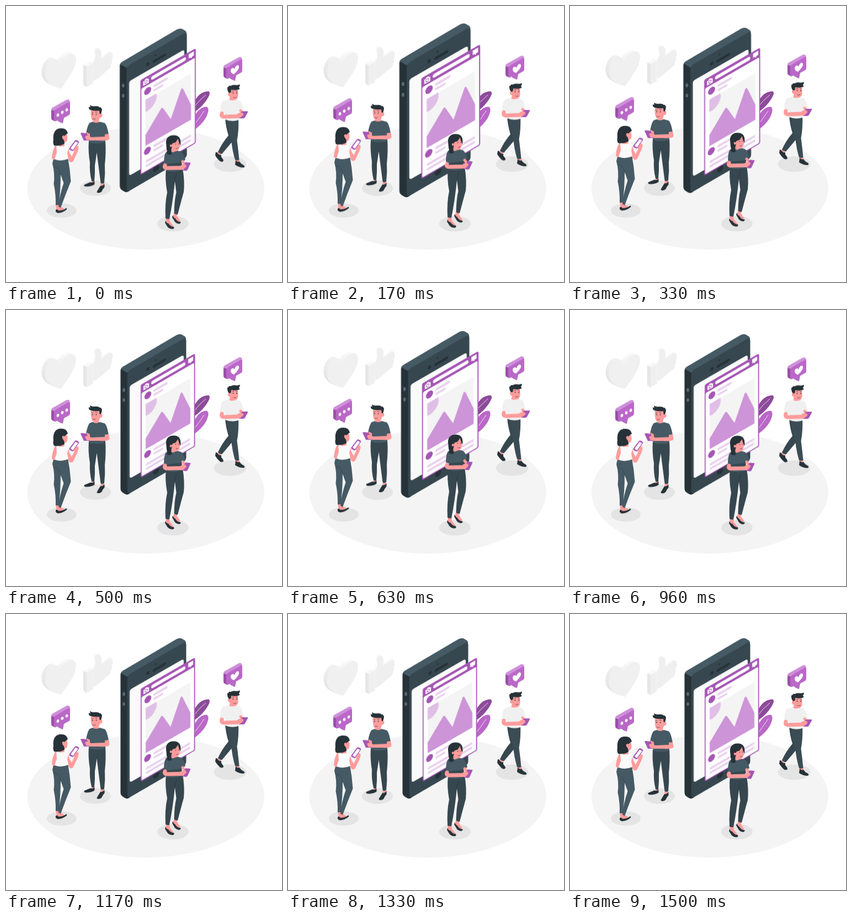
An HTML page that plays this animation: 500x500 px, repeating every 1540 ms.

```html
<!DOCTYPE html>
<html lang="en">
<head>
<meta charset="utf-8">
<title>Social feed</title>
<style>
  html, body { margin: 0; width: 100%; height: 100%; overflow: hidden; background: #fff; }
  svg { display: block; width: 100%; height: 100%; }

  .beat { transform-origin: 275px 189.5px; animation: beat 1540ms linear infinite; }
  .float { animation: float 1540ms linear infinite; }

  @keyframes beat {
    0% { transform: scale(1.02); }
    7.92% { transform: scale(1.1); }
    27.4% { transform: scale(1); }
    37.14% { transform: scale(1); }
    46.88% { transform: scale(1.1); }
    56.62%, 100% { transform: scale(1); }
  }
  @keyframes float {
    0% { transform: translateY(-.4px); }
    46.75% { transform: translateY(-10px); }
    95.5%, 100% { transform: translateY(0); }
  }

  .skin { fill: #ff9c9c; }
  .ink { fill: #263238; }
  .slate { fill: #37474f; }
  .steel { fill: #455a64; }
  .pur { fill: #ba68c8; }
  .deep { fill: #a656b5; }
  .pale { fill: #ead2ee; }
  .white { fill: #fff; }
  .line { fill: none; stroke: #263238; stroke-width: .7; stroke-linecap: round; }
  .arm { fill: none; stroke: #ff9c9c; stroke-width: 7; stroke-linecap: round; stroke-linejoin: round; }
  .thin { stroke-width: 5; }
</style>
</head>
<body>
<svg viewBox="0 0 500 500">
  <defs>
    <linearGradient id="rim" x1="0" y1="1" x2=".6" y2="0">
      <stop offset="0" stop-color="#e0e0e0"/>
      <stop offset="1" stop-color="#f8f8f8"/>
    </linearGradient>
    <clipPath id="photo"><rect x="9" y="40" width="81" height="80"/></clipPath>
    <path id="heart" d="M100 150C92 147 70.500 143 70.500 123C70.500 106 82 95 89 96C94 97 96 101 97 106C100 97 111 86.500 120 87C129 89 128 101 124 111C118 126 106 140 100 150Z"/>
    <path id="thumb" d="M158 136V104C161 100 163 96 162 90L161 82Q163 76 169 78Q174 81 173 89L172 96L187 85Q193 83 193 89Q195 94 191 98Q194 102 190 106Q191 111 187 114L168 130Q162 135 158 136Z"/>
    <g id="bubble">
      <path fill="#9a4fa8" d="M82 188L88 190V209L84 207Q82 206 82 203Z"/>
      <path fill="#ce8fd9" d="M82 189Q82 185 85 184L110 170Q113 169 115 171L116 175L89 191L87 190Z"/>
      <path class="pur" d="M87 193Q87 190 89 188.500L113 174.500Q116 173 116 176.500V194Q116 197 114 198L105 203L103 213L95 207L90 209Q87 210 87 207Z"/>
      <path fill="#9a4fa8" d="M93 208L95 207L103 213L100 212Z"/>
    </g>
  </defs>

  <ellipse cx="253.3" cy="330.3" rx="214.5" ry="111" fill="#f4f4f4"/>
  <g fill="#e4e4e4">
    <ellipse cx="101" cy="370.5" rx="27" ry="13"/>
    <ellipse cx="162" cy="330" rx="28" ry="14"/>
    <ellipse cx="302.3" cy="394.5" rx="28.5" ry="14"/>
    <ellipse cx="406" cy="286.5" rx="29.5" ry="14"/>
  </g>

  <!-- leaves -->
  <path fill="#8c4b9a" d="M336 194C337 175 348 154.500 367 154.500Q370 155.500 368.500 161C364 172 352 186 340 193Z"/>
  <path class="pur" d="M334 228C337 205 346 183 363 182.500Q367 183 366.500 190C364 204 354 216 336 228Z"/>
  <path fill="none" stroke="#fff" stroke-width=".8" d="M338 187Q348 172 362 161M338 219Q350 204 359 190"/>

  <!-- phone -->
  <g class="beat">
    <path class="ink" d="M207.400 110Q207.400 105.500 211.500 103L309 45.500Q315 42.500 319 45L324 48Q326.300 50 326.300 56V268Q326 272 321 275L226 331Q220 336.500 215 333L211 330.500Q207.400 328 207.400 323Z"/>
    <path class="steel" d="M208.200 107Q209 104.500 211.500 103L309 45.500Q315 42.500 319 45L324 48Q325.500 49 326 52L300 70L222 113L219.500 113.500Z"/>
    <g fill="#566a74">
      <ellipse cx="213.500" cy="145" rx="2.300" ry="3.500"/>
      <ellipse cx="213.500" cy="163" rx="2.300" ry="3.500"/>
    </g>
    <g transform="translate(219.600 111) skewY(-30)">
      <rect class="slate" width="106.700" height="223.500" rx="6"/>
      <rect x="4.400" y="29" width="98" height="168" rx="4" fill="#fafafa"/>
      <g class="ink">
        <circle cx="37.400" cy="17.500" r="3"/>
        <rect x="46" y="16.500" width="24" height="4.800" rx="2.400"/>
        <circle cx="51.400" cy="9.500" r="1.500"/>
        <circle cx="52.400" cy="211" r="5.500"/>
      </g>
    </g>

    <!-- feed card -->
    <g transform="translate(244 135.500) skewY(-30)">
      <rect class="deep" width="98.500" height="168.500" rx="3"/>
      <rect class="white" x="1.700" y="16" width="95" height="150.700" rx="2"/>
      <g class="white">
        <path d="M5 5.500H7.500L8.500 3.500H12L13 5.500H15V13H5Z"/>
        <rect x="19" y="4.800" width="62" height="6.500" rx="3.250"/>
        <path d="M86 3.500H95V11H92L90.500 13.500L89 11H86Z"/>
      </g>
      <circle cx="10" cy="9" r="2.300" fill="none" stroke="#a656b5"/>
      <circle class="deep" cx="13" cy="26.500" r="6.200"/>
      <circle class="deep" cx="12.500" cy="132.500" r="6.200"/>
      <g class="pale">
        <rect x="23" y="22" width="26" height="4.500" rx="2.200"/>
        <rect x="23" y="30" width="18" height="4" rx="2"/>
        <rect x="23" y="128.500" width="26" height="4.500" rx="2.200"/>
        <rect x="23" y="136.500" width="18" height="4" rx="2"/>
        <rect x="9" y="148" width="81" height="4.300" rx="2.100"/>
        <rect x="9" y="156" width="81" height="4.300" rx="2.100"/>
      </g>
      <g clip-path="url(#photo)">
        <rect x="9" y="40" width="81" height="80" fill="#f4f4f4"/>
        <circle cx="12" cy="45" r="17" fill="#e0bfe7"/>
      </g>
    </g>
    <path fill="#cd94d8" d="M253 233L281 185.500Q283 183 285 186L298 204.500L316 152Q318 147 320.500 152L334 179V205.500L253 252Z"/>
  </g>

  <g class="float">
    <!-- heart and thumb -->
    <use href="#heart" x="-6" y="-2.500" fill="url(#rim)"/>
    <use href="#heart" x="-3" y="-1" fill="url(#rim)"/>
    <use href="#heart" fill="#f0f0f0"/>
    <use href="#thumb" x="-1.500" y="-2" fill="#f8f8f8"/>
    <use href="#thumb" fill="#efefef"/>
    <path fill="#e6e6e6" d="M140 107L146 110V147L140 143Z"/>
    <path fill="#f8f8f8" d="M140 107L152 101L157 104L146 110Z"/>
    <path fill="#efefef" d="M146 110L157.500 104V140.500L146 147Z"/>

    <!-- bubbles -->
    <use href="#bubble"/>
    <g class="white">
      <ellipse cx="94" cy="198" rx="2.300" ry="2.900" transform="rotate(20 94 198)"/>
      <ellipse cx="102" cy="193" rx="2.300" ry="2.900" transform="rotate(20 102 193)"/>
      <ellipse cx="110" cy="188.500" rx="2.300" ry="2.900" transform="rotate(20 110 188.500)"/>
    </g>
    <g transform="translate(312 -77)">
      <use href="#bubble"/>
      <path class="white" d="M101 201C98 200 95 198 95 194.500C95 190 100 188 102 191.500C104 185 109 182 110 187C111 191.500 104 198 101 201Z"/>
    </g>

    <!-- woman with her back turned -->
    <g>
      <path class="skin" d="M90 359H97L98 364L105 367L104 372L92 372Z"/>
      <path class="ink" d="M90 370Q92 367 95 371Q103 371 109 366.500Q111 367 110 369Q102 375.500 94 375.500Q89 374 90 370Z"/>
      <path class="steel" d="M86 277L112 275Q116 296 117.500 318Q108 341 99 366L95 363.500Q97 343 104.500 321L99 306Q99 335 95.500 361H90Q90.500 341 86.500 323Q89 304 84 286Z"/>
      <path fill="none" stroke="#37474f" stroke-width=".8" d="M86 292Q97 292 99 306"/>
      <path class="skin" d="M90 252Q84 261 83 276L86 279L92 277L93 256Z"/>
      <path class="skin" d="M108 255Q113 256 115 266L119 273L124 263L126 257L131 255Q132 260 129 266L122 281Q118 286 114 281L108 270Z"/>
      <path fill="#fafafa" d="M91 252L108 251L113 258L111 267L113 277Q100 283 88 278L92 266Z"/>
      <path class="skin" d="M99 230H109Q112.500 236 111 244Q109.500 248 105 247.500L106 254L96 255Z"/>
      <path class="ink" d="M86 243C84.500 228 91 222 99 222Q110 221 112 231Q108 233 106 236Q104 234 102 236Q101 240 104 242Q106 245 106 250Q97 255 87 253Q84.500 248 86 243Z"/>
      <path class="deep" d="M114.500 258L125 244Q126 243 128 243.500L131 245Q133 246 132 248L122.500 262Q121 263.500 119 262.500L115 260.500Q114 259.500 114.500 258Z"/>
      <path class="white" d="M116.800 258.300L126 245.800L130.600 248L121.300 261Z"/>
      <path class="skin" d="M122 262L125.500 257Q129 252.500 131 255L131.500 259L127 264Z"/>
    </g>

    <!-- man in a dark shirt -->
    <g>
      <path class="skin" d="M155 315H160V321L154 323ZM172 319H177.500V326L171 328Z"/>
      <path class="ink" d="M142 324L153 319.500Q157 321 160.500 318V323.500Q155 327.500 145 327.500Q140 327 142 324ZM165 336L171 326Q175 327 178.500 322.500V328.500Q175 332 173 337Q168 340.500 164.500 338Z"/>
      <path class="slate" d="M150 245H180Q181.500 266 179 288Q180 304 178 321Q174 323 171.500 321L167.500 290L164.500 266L161 289Q161.500 303 160 318Q157 319 155 317Q151 302 152 284Q148.500 264 150 245Z"/>
      <path class="skin" d="M159 204H168.500V213Q163 216 158 212Z"/>
      <path class="steel" d="M157 210Q163 214 170 210L179 212.500Q183 216 186 233L179 235L180 247Q165 252 150 247L152 234L145 231Q148 215 151.500 212Z"/>
      <path class="skin" d="M179 233L186 232Q188 239 187 242Q182 245 170 244L151 244L146 240L148 235L154 238L179 237Z"/>
      <path class="skin" d="M146 229L152 232L152 240L145 239Z"/>
      <path class="deep" d="M135 231Q136 230 138 230L146 231L152 242Q152 244 150 244L141 244Z"/>
      <path class="skin" d="M143 237Q147 233 153 237L153 243L146 243Z"/>
      <path class="skin" d="M154 188H170L171 195Q175 195 174.500 199Q173.500 203 170.500 202Q169 208 164 210Q157 211 155 205Q153 198 154 188Z"/>
      <path class="ink" d="M150 183Q152 184 153 183Q151.500 181 152 180Q156 182.500 160 182Q167 181 170 184L172 184Q172.500 186 174 187Q173.500 193 172 196L169.500 195.500L169 190Q160 191 154 189Q149 188 150 183Z"/>
      <g class="ink"><circle cx="157" cy="196.500" r=".9"/><circle cx="163.500" cy="196.500" r=".9"/></g>
      <path class="line" d="M155.500 193.500L158 193M162 192.500L165 193M157.500 205Q160 206 162 205"/>
    </g>

    <!-- woman in front -->
    <g>
      <path class="skin" d="M290 383H296L297 391L304 400L296 402L289 393ZM305 374H311L309.500 380L316 390L308 392L302 382Z"/>
      <path class="ink" d="M289 389.500Q291 394 294 394Q298 400 304 400.500Q306 403 302 404.500Q294 404 291 398L288 393ZM302 379.500Q304 384 306.500 385Q310 391 316 391.500Q318 393 314 395Q307 395 304 388L301 383Z"/>
      <path class="slate" d="M290 295L320 294Q324 318 322 337Q317 355 311 378Q307 378 304.500 376Q305 352 308.500 338L306 318Q302 357 296 386Q292 387 289 385Q287.500 359 292 338Q287.500 314 290 295Z"/>
      <path class="line" d="M306 318Q305 311 309 305"/>
      <path class="skin" d="M299 257H308V265Q303 268 298 265Z"/>
      <path class="steel" d="M298 263Q303 268 309 262L317 264Q322 267 325 279L318 284L320 297Q305 303 290 298L292 287L286 285Q286 268 291 264Z"/>
      <path class="slate" d="M292 287L318 284L319 289L292 290Z"/>
      <path class="arm" d="M288 289Q286 293 290 294L318 293.500"/>
      <path class="arm thin" d="M320 282L325 288"/>
      <path class="deep" d="M324 285Q325 283 327 283.500L333 284Q335 284 334 286L329 297Q328 299 326 299L319 298Z"/>
      <path class="skin" d="M316 290Q320 285 326 288L327 291L321 297L315 297Z"/>
      <path class="skin" d="M299 242H313Q316 250 314.500 256Q313 262 308.500 263.500Q302 262 299.500 256Z"/>
      <path class="ink" d="M290 249C289 239 296 234.500 303 234.500Q314 234 316 243Q317 248 316 253Q313 248 311.500 241Q308 248 302 249Q300 251 301 255Q298 262 300.500 269Q294 271 291 268Q293 266 291 260Z"/>
      <circle class="skin" cx="299" cy="253.500" r="2.300"/>
      <g class="ink"><circle cx="307.500" cy="250.500" r=".8"/><circle cx="312.500" cy="250" r=".8"/></g>
      <path class="line" d="M306 247.500L308.500 246.500M308 258.500Q310 259.500 312 257.500"/>
    </g>

    <!-- man in a white shirt -->
    <g>
      <path class="skin" d="M385 262L391 265L388 272L382 270ZM415 277H422L424 285L417 286Z"/>
      <path class="ink" d="M380 265Q383 265 384 268Q387 271 390 270L390 274Q394 278 394 281Q391 284 387 281Q381 275 379 271ZM416 280Q420 284 423 282Q426 287 431 289Q434 292 430 293Q422 293 415 288Z"/>
      <path class="slate" d="M397 203H421Q422 228 416 239Q405 252 391 268.500Q387 268 384 265Q391 249 403 235Q398 219 397 203Z"/>
      <path fill="#3b4c55" d="M401 206L421 205Q422 226 418.500 244Q421 263 422.500 279Q419 281 415 279Q410 263 408 243Q401 224 401 206Z"/>
      <path class="skin" d="M406 164H415V174Q409 177 404 172Z"/>
      <path fill="#f0f0f0" d="M403 169Q409 174 416 169L424 172Q428 176 430 188L422 193L421 207Q409 211 397 206L397 194L388 192Q388 177 393 172Z"/>
      <path class="arm" d="M391 195Q389 200 394 201L421 200"/>
      <path class="arm thin" d="M425 190L429 194"/>
      <path class="deep" d="M426 193Q427 191 429 191L437 191Q439 191 438 193L433 202Q432 204 430 204L422 204Z"/>
      <path class="skin" d="M419 196Q424 191 430 195L430 198L424 203L418 203Z"/>
      <path class="skin" d="M406 151H419.500Q421 158 420.500 164Q419 171 413 171Q406 169 405 164Q401.500 163 402 159Q403 156 405.500 157Z"/>
      <path class="ink" d="M401 150Q400 147 403 147Q403 144 407 145Q411 142.500 416 143.500Q420 144 424 142.500Q424 146 421.500 148Q424 149 423 151Q418 154 408 152L407.500 157L404.500 158Q401 155 401 150Z"/>
      <g class="ink"><circle cx="411.500" cy="158" r=".9"/><circle cx="418" cy="158" r=".9"/></g>
      <path class="line" d="M410 154.800L412.500 154.500M417 154.500L419.500 155M412 166Q415 167 417 165.500"/>
    </g>
  </g>
</svg>
</body>
</html>
```
